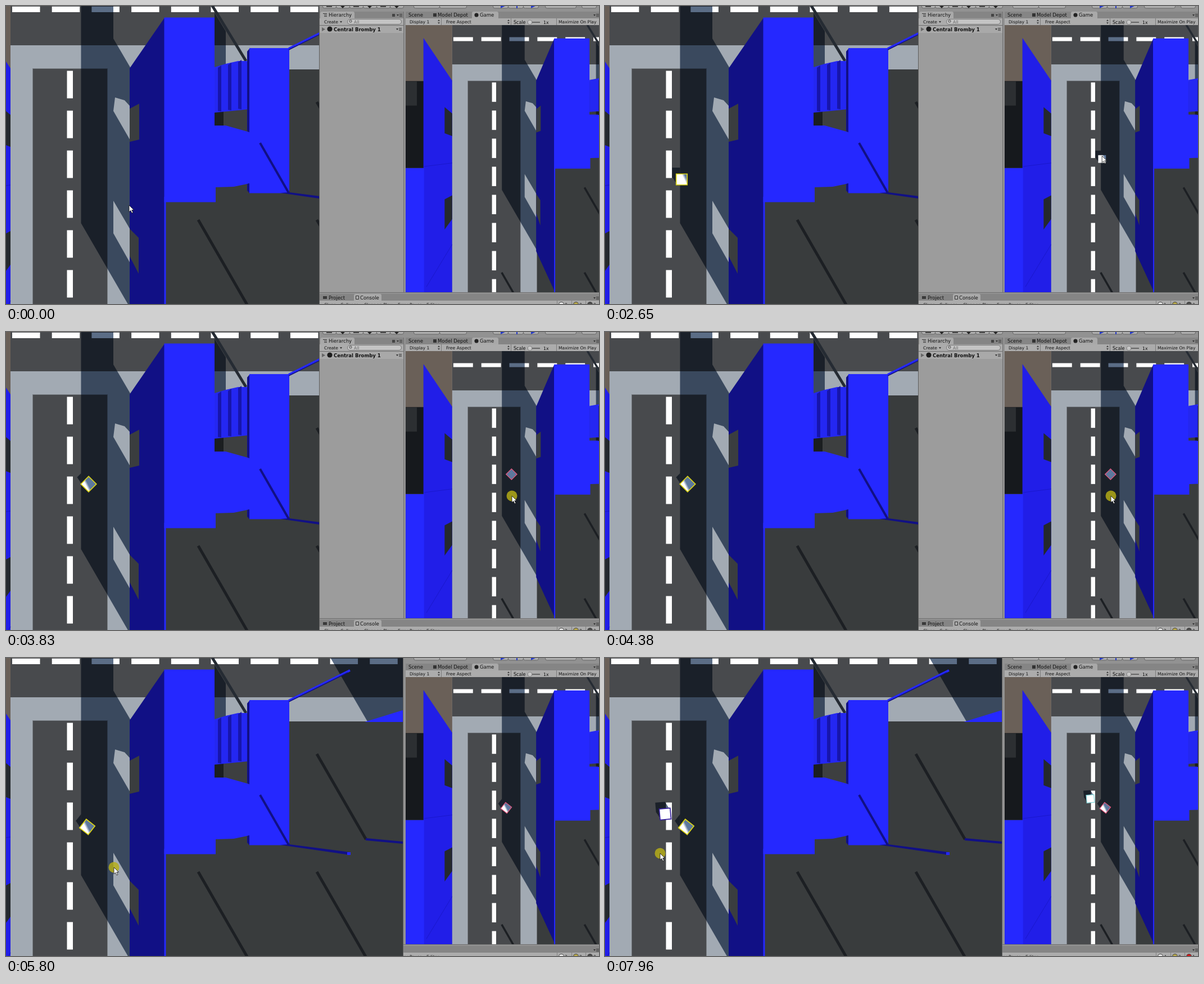
An HTML page with a canvas for the animation above (8000 ms loop, 1055 px wide and 531 px high).

```html
<!DOCTYPE html>
<html lang="en">
<head>
<meta charset="utf-8">
<title>Editor with scene and game view</title>
<style>
html, body { margin: 0; width: 100%; height: 100%; overflow: hidden; background: #9c9c9c; }
canvas { display: block; }
</style>
</head>
<body>
<canvas id="stage" width="1055" height="531"></canvas>
<script>
const W = 1055, H = 531, LOOP = 8000;
const BLUE = '#2528ff', NAVY = '#111085', ROAD = '#484a4d', WALK = '#a2aab3';
const GROUND = '#393c3d', SHADE = 'rgb(91,109,134)', LINE = '#1c1f23';
const out = document.getElementById('stage').getContext('2d');
let c = out;

// Both cameras look at the same street; roof is the parallax of high parts.
const scene = { box: [0, 0, 557, H], k: 1, x: 0, y: 0, roof: 0, lift: 0, colors: ['#dcd516', '#36209c'] };
const game = { box: [711, 34, 344, 476], k: .705, x: 788.1, y: 54.8, roof: -16.4, lift: 10.8,
  colors: ['#e8557c', '#7fd4d8'] };

function rect(color, x0, y0, x1, y1) {
  c.fillStyle = color;
  c.fillRect(x0, y0, x1 - x0, y1 - y0);
}

function trace(pts) {
  for (let i = 0; i < pts.length; i += 2) {
    i ? c.lineTo(pts[i], pts[i + 1]) : c.moveTo(pts[i], pts[i + 1]);
  }
  c.closePath();
}

function poly(color, ...pts) {
  c.beginPath();
  trace(pts);
  c.fillStyle = color;
  c.fill();
}

function line(color, width, x0, y0, x1, y1) {
  c.beginPath();
  c.moveTo(x0, y0);
  c.lineTo(x1, y1);
  c.strokeStyle = color;
  c.lineWidth = width;
  c.stroke();
}

function disc(color, x, y, r) {
  c.beginPath();
  c.arc(x, y, r, 0, 7);
  c.fillStyle = color;
  c.fill();
}

function pill(fill, edge, x, y, w, h, r) {
  c.beginPath();
  c.roundRect(x + .5, y + .5, w, h, r);
  c.fillStyle = fill;
  c.fill();
  c.strokeStyle = edge;
  c.lineWidth = 1;
  c.stroke();
}

function text(str, x, y, size = 8.5, color = '#111', weight = '') {
  c.font = `${weight} ${size}px "DejaVu Sans", sans-serif`;
  c.fillStyle = color;
  c.fillText(str, x, y);
}

function clipped(box, draw) {
  c.save();
  c.beginPath();
  c.rect(...box);
  c.clip();
  draw();
  c.restore();
}

function inView(v, draw) {
  clipped(v.box, () => {
    c.translate(v.x, v.y);
    c.scale(v.k, v.k);
    draw(v);
  });
}

// First outline is darkened, the following ones stay lit.
function shadow(...shapes) {
  c.globalCompositeOperation = 'multiply';
  c.beginPath();
  shapes.forEach(trace);
  c.fillStyle = SHADE;
  c.fill('evenodd');
  c.globalCompositeOperation = 'source-over';
}

function poleShadow(x, y, h) {
  line(LINE, 5, x, y, x + h * .575, y + h);
}

function street() {
  rect(ROAD, 8, -30, 706, 70);
  rect(WALK, 8, 70, 706, 113);
  rect(WALK, 8, 112, 222, 650);
  rect(GROUND, 222, 113, 706, 650);
  rect('#7b8086', 47, 111, 181, 650);
  rect(ROAD, 48, 112, 180, 650);
  for (let i = 0; i < 8; i++) rect('#fff', 108.5, 115.5 + i * 71, 119, 164.5 + i * 71);
  for (let i = 0; i < 10; i++) rect('#fff', 11 + i * 70.7, 1, 60.5 + i * 70.7, 11);

  shadow([133.5, -30, 191, -30, 191, 58, 222, 111, 222, 540, 133.5, 387],
    [191, 187, 194, 163, 211, 168, 222, 180, 222, 241],
    [191, 347, 222, 400, 222, 460, 191, 405]);
  shadow([371, 12, 391, 45, 391, 113, 371, 113]);
  shadow([560, -30, 706, -30, 706, 113, 643, 113]);
  line('#252b33', 5, 349, -30, 427, 98);
  poleShadow(342, 381, 155);
  poleShadow(553, 381, 155);
  poleShadow(553, 171, 152);
  poleShadow(133, 596, 60);
  poleShadow(342, 596, 60);
}

function leftBlock() {
  rect('#6a6058', -110, -30, 8, 113);
  rect('#16191d', -110, 112, -60, 332);
  rect('#2c2f32', -110, 113, -81, 174);
  poly('#211ee8', -64.5, 3, 8, 111, 8, 650, -64.5, 650);
  rect(BLUE, -110, 332, -63, 650);
  line('#1a18cc', 1.4, -63, 328, 8, 319);
  line('#1a18cc', 1.4, -57, 632, 8, 525);
  poly('#25292d', -11, 178, 8, 194, 8, 251, -11, 244);
  poly('#25292d', -11, 411, 8, 401, 8, 461, -11, 487);
}

function towers({ roof: r }) {
  poly(NAVY, 282 + r, 21 + r, 220, 111, 220, 542, 284 + r, 662 + r);
  poly('#3a3d3f', 220, 183, 237 + r / 3, 174, 237 + r / 3, 238, 220, 242);
  poly('#3a3d3f', 220, 397, 236 + r / 3, 413, 236 + r / 3, 477, 220, 446);

  rect('#3d3f40', 371, 184, 434, 228);
  rect('#1b1e20', 371, 188, 387, 213);
  poly('#2427f2', 371 + r, 109, 391, 103, 413, 98, 432, 98, 432, 184, 371 + r, 190);
  for (let i = 0; i < 3; i++) {
    const x = 377 + i * 18, y = 110 - i * 5;
    poly('#1715ac', x, y, x + 6, y - 4, x + 6, 188 - i * 2, x, 187 - i * 2);
  }

  c.save();
  c.translate(r, r);
  rect(BLUE, 281.5, 340, 284.5, 662);
  poly(BLUE, 281.5, 20.5, 371, 20.5, 371, 213, 391, 213, 434, 225, 434, 316, 405, 322, 373, 323,
    373, 349.5, 281.5, 349.5);
  poly(NAVY, 429, 81, 434, 75, 434, 334, 429, 329, 429, 317, 433, 316, 433, 225, 429, 223);
  rect(BLUE, 433, 75, 504, 333.5);
  line(NAVY, 4, 452, 244, 503, 333);
  line(BLUE, 4, 503, 76, 612, 22);
  line(NAVY, 1.5, 503, 78, 608, 26);
  poly(NAVY, 488, 333, 504, 332, 612, 346, 612, 351);
  rect(BLUE, 607, 346, 613, 351);
  poly(BLUE, 638, 114, 706, 93, 706, 114);
  line(NAVY, 4, 640, 323, 706, 329);
  c.restore();
}

function world(view) {
  street();
  leftBlock();
  towers(view);
}

function arrows(x, y) {
  poly('#444', x, y - 1, x + 2, y - 4, x + 4, y - 1);
  poly('#444', x, y + 1, x + 2, y + 4, x + 4, y + 1);
}

function menu(x, y) {
  poly('#333', x, y, x + 4, y, x + 2, y + 3);
  for (let i = 0; i < 3; i++) rect('#444', x + 5, y - 1 + i * 2, x + 10, y + i * 2);
}

function tab(x0, x1, y) {
  c.beginPath();
  c.roundRect(x0, y, x1 - x0, 13, [3, 3, 0, 0]);
  c.fillStyle = '#a9a9a9';
  c.fill();
}

function mainToolbar() {
  const button = (x, w) => pill('#adadad', '#676767', x, -12, w, 15.5, 3);
  for (let i = 0; i < 6; i++) {
    const x = 575 + i * 24;
    button(x - 12, 24);
    i % 2 ? poly('#222', x - 4, 0, x + 4, 0, x, 4) : line('#222', 1.5, x - 5, 1, x + 5, 1);
  }
  for (let i = 0; i < 3; i++) {
    const x = 866 + i * 27;
    button(x, 27);
    i === 1 ? rect('#2438c8', x + 15, 0, x + 17, 4) : poly('#2438c8', x + 14, 0, x + 22, 0, x + 14, 4);
  }
  button(725, 46);
  button(771, 48);
  button(959, 55);
  button(1024, 26);
}

function hierarchy() {
  rect('#858585', 558, 10, 708, 22);
  tab(559, 620, 10);
  for (let i = 0; i < 3; i++) rect('#333', 564 + (i ? 2 : 0), 13 + i * 2.5, 571, 14 + i * 2.5);
  text('Hierarchy', 574, 19);
  rect('#444', 687, 14, 692, 19);
  menu(695, 15);
  rect('#acacac', 558, 22, 708, 34);
  text('Create', 566, 31, 7.5);
  poly('#333', 594, 27, 598, 27, 596, 30);
  pill('#c4c4c4', '#777', 607, 23, 96, 9, 5);
  disc('#555', 613, 27, 2.5);
  disc('#c4c4c4', 613, 27, 1.5);
  text('All', 619, 30.5, 7.5, '#666');
  rect('#6e6e6e', 558, 34, 708, 35);
  rect('#9c9c9c', 558, 35, 708, 510);
  rect('#a9a9a9', 558, 35, 708, 48);
  poly('#666', 562, 38, 568, 41.5, 562, 45);
  disc('#1d1d1d', 576, 41, 4.6);
  text('Central Bromby 1', 583, 44.5, 8.5, '#111', 'bold');
  menu(694, 40);
  rect('#707070', 707, 10, 708, 511);
}

function gamePanel() {
  rect('#858585', 711, 10, W, 22);
  tab(829, 876, 10);
  text('Scene', 716, 19);
  rect('#333', 760, 13, 766, 19);
  text('Model Depot', 768, 19);
  disc('#222', 837, 16, 3.6);
  text('Game', 843, 19);
  menu(1045, 15);
  rect('#acacac', 711, 22, W, 34);
  for (const x of [774, 898, 979]) rect('#7a7a7a', x, 22, x + 1, 34);
  text('Display 1', 718, 31, 7.6);
  arrows(768, 28);
  text('Free Aspect', 783, 31, 7.7);
  arrows(892, 28);
  text('Scale', 903, 31.5, 8);
  rect('#666', 932, 28, 950, 30);
  disc('#777', 932, 29, 4.3);
  disc('#c8c8c8', 932, 29, 3.4);
  text('1x', 956, 31.5, 7.8);
  text('Maximize On Play', 983, 31, 7.6);
  inView(game, world);
}

function consolePanel() {
  rect('#707070', 558, 510, W, 511);
  rect('#858585', 558, 513, W, 525);
  tab(619, 668, 513);
  rect('#3a3a3a', 564, 517, 571, 522);
  text('Project', 574, 522.5);
  pill('#a9a9a9', '#333', 622, 516, 5, 6, 0);
  text('Console', 630, 522.5);
  menu(1045, 519);
  rect('#acacac', 558, 525, W, H);
  text('Clear', 566, 535, 7.6);
  text('Collapse', 595, 535, 7.6);
  text('Clear on Play', 637, 535, 7.6);
  text('Error Pause', 697, 535, 7.6);
  text('Editor', 748, 535, 7.6);
}

function bake(split) {
  const layer = document.createElement('canvas');
  layer.width = W;
  layer.height = H;
  c = layer.getContext('2d');
  rect('#929292', 0, 0, W, H);
  mainToolbar();
  hierarchy();
  gamePanel();
  consolePanel();
  inView({ ...scene, box: [0, 0, split, H] }, world);
  rect('#5e5e5e', split, 0, split + 1, H);
  if (split > 600) rect('#929292', split + 1, 0, 711, 510);
  return layer;
}

// Position after eased moves of the form [start, end, ...target]
function after(moves, home, t) {
  return moves.reduce((pos, [from, to, ...goal]) => {
    const u = Math.min(1, Math.max(0, (t - from) / (to - from)));
    const e = u * u * (3 - 2 * u);
    return pos.map((v, i) => v + (goal[i] - v) * e);
  }, home);
}

const mouseMoves = [
  [30, 880, 833, 290], [1200, 1470, 850, 289], [1500, 1970, 885, 267],
  [2830, 3250, 905, 240], [3250, 3830, 900, 292], [4470, 4970, 887, 267],
  [5290, 5800, 192, 373], [6640, 6780, 189, 377], [6920, 7690, 98, 348]
];
const presses = [[1880, 2130], [3000, 4420], [5750, 5950], [7300, LOOP]];
const cubes = [
  { born: 1900, home: [136.5, 309, 0], moves: [[2830, 3600, 147, 271, 45], [4470, 4900, 132.5, 288, 39],
    [4980, 5250, 144.5, 301, 38]], held: [2830, 5100] },
  { born: 7300, home: [103, 288, 0], moves: [[7300, 7960, 107, 278, -5]], held: [0, 0] }
];

function square(x, y, side, deg) {
  return [0, 1, 2, 3].flatMap(i => {
    const a = (deg + 45 + i * 90) * Math.PI / 180;
    return [x + Math.cos(a) * side * Math.SQRT1_2, y + Math.sin(a) * side * Math.SQRT1_2];
  });
}

function drawCube(cube, color, view, t) {
  const side = 19.5, wall = 133.5;
  const lift = t > cube.held[0] && t < cube.held[1] ?
    view.lift * Math.min(1, (t - cube.held[0]) / 300, (cube.held[1] - t) / 100) : 0;
  let [x, y, deg] = after(cube.moves, cube.home, t);
  x += lift;
  y += lift;
  clipped([wall - 200, 0, 200, H], () => {
    c.globalCompositeOperation = 'multiply';
    c.beginPath();
    for (let i = 1; i <= 5; i++) trace(square(x - i * 1.6, y - i * 2.4, side * .92, deg));
    c.fillStyle = SHADE;
    c.fill();
  });
  const g = c.createLinearGradient(wall + 8, y + 1, wall + 12, y - 1);
  g.addColorStop(0, '#fff');
  g.addColorStop(1, '#5d789d');
  poly(g, ...square(x, y, side, deg));
  if (view === game && t < 3000) return;
  c.strokeStyle = color;
  c.lineWidth = 1.7;
  c.stroke();
}

function badge(x, color, n) {
  rect('#808080', x - 8, 525, x - 7, H);
  disc('#444', x, 532, 5);
  disc(color, x, 532, 4);
  text(n, x + 6, 535, 7.6);
}

function drawMouse(t) {
  let [x, y] = after(mouseMoves, [219, 355], t);
  if (t > 2010 && t < 2740) x -= 6 * Math.sin((t - 2010) / 730 * Math.PI) ** 2;
  if (presses.some(([a, b]) => t >= a && t < b)) disc('rgba(184,176,22,.82)', x, y, 9.5);
  c.save();
  c.translate(x, y);
  poly('#fff', 0, 0, 0, 12, 2.7, 9.4, 5, 14, 7, 13, 4.8, 8.6, 8.5, 8.6);
  c.strokeStyle = '#111';
  c.lineWidth = .8;
  c.stroke();
  c.restore();
}

const narrow = bake(557), wide = bake(706);
c = out;

function frame(t) {
  c.drawImage(t < 5450 ? narrow : wide, 0, 0);
  const failed = t >= 7300;
  badge(988, '#e6e6e6', presses.filter(p => t >= p[0]).length);
  badge(1014, '#b9a94a', 0);
  badge(1039, failed ? '#d01818' : '#4a4a4a', +failed);
  for (const view of [scene, game]) {
    inView(view, () => cubes.forEach((cube, i) => {
      if (t >= cube.born) drawCube(cube, view.colors[i], view, t);
    }));
  }
  drawMouse(t);
}

const start = performance.now();
function tick() {
  frame((performance.now() - start) % LOOP);
  requestAnimationFrame(tick);
}
tick();
</script>
</body>
</html>
```
